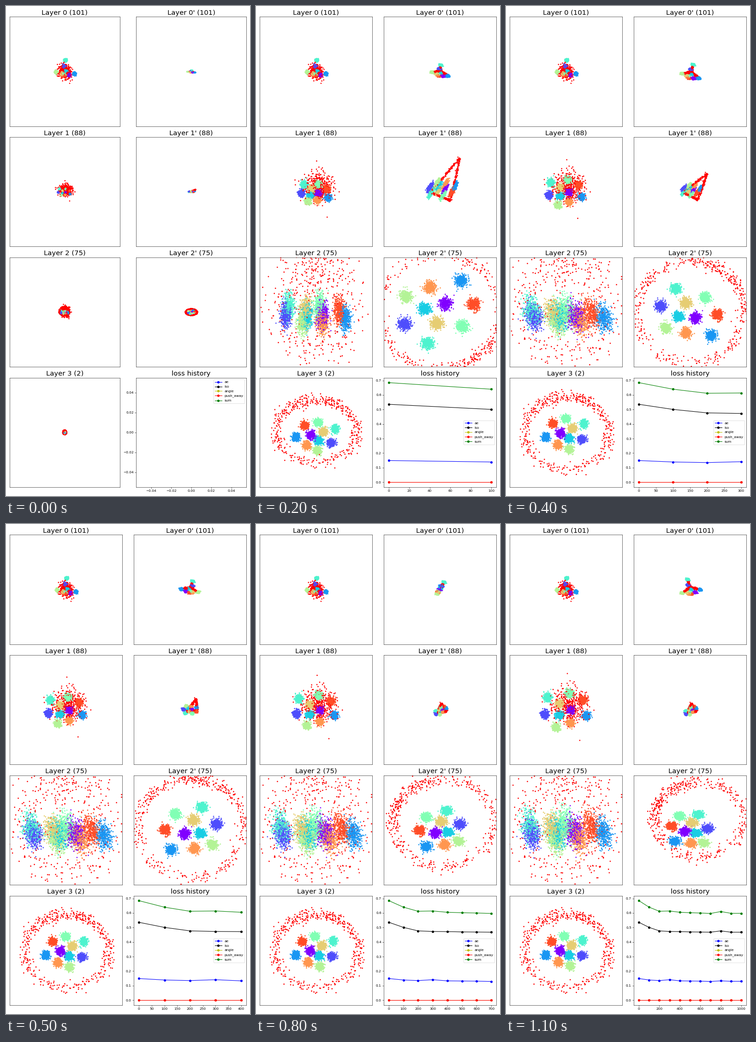
Write a matplotlib script that moves like this. It is 529 px wide and 1058 px high and loops after 1.2 s.

```python
import numpy as np
import matplotlib.pyplot as plt
from matplotlib.animation import FuncAnimation

W, H, DPI = 529, 1058, 52.9
FRAMES, STEP_MS = 12, 100
COUNT, OUTER_COUNT = 400, 450
HALF_W, HALF_H = 122.2, 117.6
COLUMN_X = (130.3, 399)
ROW_Y = (141.6, 400.9, 660.3, 919.6)
COLORS = plt.cm.rainbow(np.linspace(0, 1, 11))
UP = -np.pi / 2

# Two base arrangements of the ten clusters, in stage pixels.
# Every layer is an affine view of one, fixed by where three clusters land.
INPUT = [(140, 149), (129, 130), (152, 146.5), (133, 140), (132, 117.5),
         (128, 147), (111, 143), (124, 146), (125, 148), (130, 150)]
LATENT = [(118, 920), (165, 930), (86, 930), (137, 930), (166, 898),
          (127, 889), (139, 953), (142, 909), (114, 945), (99, 901)]
ANCHORS = [2, 4, 6]  # blue, turquoise, light green


def at(keys, step):
    """Keyed value, linear between its neighbouring keys."""
    lo = max((k for k in keys if k <= step), default=min(keys))
    hi = min((k for k in keys if k >= step), default=max(keys))
    t = (step - lo) / (hi - lo) if hi > lo else 0
    return (1 - t) * np.array(keys[lo], float) + t * np.array(keys[hi], float)


def affine_view(base, anchors):
    """Move the base so that its three anchor clusters land on the given ones."""
    rows = np.column_stack([base, np.ones(len(base))])
    return rows @ np.linalg.inv(rows[ANCHORS]) @ anchors


def cluster_points(centres, spread, rng):
    sx, sy, slope = spread
    gx, gy = rng.normal(size=(2, 10, COUNT))
    offset = np.stack([sx * gx,
                       sy * (slope * gx + np.sqrt(1 - slope**2) * gy)], -1)
    return (centres[:, None] + offset).reshape(-1, 2)


# The outer sphere (red): each helper returns a function of step, anchors, rng.
def cloud(keys):
    def points(step, anchors, rng):
        cx, cy, sx, sy = at(keys, step)
        return (cx, cy) + rng.normal(size=(OUTER_COUNT, 2)) * (sx, sy)
    return points


def ring(keys, noise, bias):
    """Noisy ellipse (cx, cy, rx, ry), densest towards the fifth value."""
    def points(step, anchors, rng):
        cx, cy, rx, ry, dense = at(keys, step)
        angle = rng.uniform(0, 2 * np.pi, OUTER_COUNT)
        angle -= bias * np.sin(angle - dense)
        ellipse = np.column_stack([cx + rx * np.cos(angle),
                                   cy + ry * np.sin(angle)])
        return ellipse + rng.normal(size=ellipse.shape) * noise
    return points


def segment_points(starts, ends, rng):
    side = rng.integers(3, size=OUTER_COUNT)
    along = rng.random((OUTER_COUNT, 1))
    line = starts[side] + along * (ends - starts)[side]
    return line + rng.normal(size=line.shape) * 1.2


def spokes(step, anchors, rng):
    hub = np.repeat(anchors.mean(axis=0)[None], 3, axis=0)
    return segment_points(hub, hub + .8 * (anchors - hub), rng)


def triangle(keys):
    def points(step, anchors, rng):
        corners = at(keys, step)
        return segment_points(corners, np.roll(corners, 1, axis=0), rng)
    return points


upright = [(445, 710), (368, 609), (347, 695)]

# Title, base, anchor keys, spread keys (sx, sy, slope), outer, start scale.
LAYERS = [
    ("Layer 0 (101)", INPUT,
     {0: [(152, 146.5), (132, 117.5), (111, 143)]},
     {0: (1.6, 1.6, 0)}, cloud({0: (130.5, 142, 7, 7)}), (1, 1)),
    ("Layer 0' (101)", INPUT,
     {2: [(416, 151), (401, 128), (382, 143)],
      4: [(418, 156), (406, 127), (382, 146)],
      5: [(381, 141), (405, 124), (416, 147)],
      7: [(421, 145), (397, 123), (384, 148)],
      9: [(383, 124), (419, 129), (402, 153)],
      11: [(421, 142), (394, 120), (382, 149)]},
     {0: (1.7, 1.2, .2)}, spokes, (.45, .2)),
    ("Layer 1 (88)", LATENT,
     {2: [(157, 414), (105, 385), (113, 421)],
      4: [(164, 412), (98, 381), (113, 429)],
      11: [(175, 414), (91, 374), (109, 438)]},
     {0: (1.7, 1.7, 0), 2: (3.2, 3.2, 0), 11: (3.9, 3.9, 0)},
     cloud({2: (134, 391, 17, 16), 11: (136, 390, 20, 19)}), (.45, .36)),
    ("Layer 1' (88)", LATENT,
     {2: [(431, 390), (379, 404), (393, 382)],
      4: [(420, 395), (385, 402), (397, 388)],
      5: [(413, 396), (389, 408), (391, 393)],
      7: [(412, 398), (390, 404), (398, 410)]},
     {2: (2.9, 4.6, -.75), 4: (2.2, 2.8, -.7), 5: (1.5, 1.3, 0)},
     triangle({2: [(442, 328), (378, 402), (422, 420)],
               4: [(436, 362), (384, 402), (416, 418)],
               5: [(412, 378), (392, 405), (414, 402)],
               7: [(402, 388), (393, 408), (413, 404)]}), (.22, .07)),
    ("Layer 2 (75)", LATENT,
     {2: [(195, 676), (71, 647), (101, 683)],
      4: [(213, 674), (56, 656), (112, 680)],
      11: [(212, 668), (52, 650), (108, 680)]},
     {2: (6, 13.5, 0), 4: (9.5, 14.5, .25), 11: (9, 16, .25)},
     ring({2: (133, 660, 65, 95, UP), 4: (132, 655, 85, 112, UP)}, 30, .72),
     (.11, .085)),
    ("Layer 2' (75)", LATENT,
     {2: [(445, 592), (372, 727), (325, 627)],
      3: upright, 4: upright,
      5: [(358, 702), (425, 610), (448, 692)],
      7: [(370, 699), (412, 615), (443, 683)],
      11: [(366, 684), (417, 626), (429, 688)]},
     {2: (6.4, 6.2, 0), 4: (5.2, 5.2, 0), 11: (5.2, 4, 0)},
     ring({2: (399, 660, 132, 124, .8), 4: (400, 661, 117, 110, -.8),
           7: (402, 648, 114, 99, -2.5), 11: (418, 638, 97, 81, -2.5)},
          7, .5), (.095, .055)),
    ("Layer 3 (2)", LATENT,
     {2: [(86, 930), (172, 912), (133, 959)],
      4: [(86, 930), (169, 901), (137, 956)],
      11: [(86, 930), (166, 898), (139, 953)]},
     {0: (4.2, 4, 0)},
     ring({2: (131, 917, 88, 68, UP), 4: (132, 921, 91, 79, UP)}, 6.5, .35),
     (.045, .065)),
]

AE = np.array([.149, .139, .135, .141, .133, .132,
               .131, .129, .133, .130, .130])
ISO = np.array([.536, .501, .477, .473, .472, .470,
                .469, .468, .477, .468, .468])
LOSSES = [("ae", "b", AE), ("iso", "k", ISO), ("angle", "y", 0 * AE),
          ("push_away", "r", 0 * AE), ("sum", "g", AE + ISO)]


def draw_layer(ax, index, step):
    title, base, anchor_keys, spread, outer, start = LAYERS[index]
    rng = np.random.default_rng(40 + index)
    anchors = at(anchor_keys, step)
    points = np.concatenate([
        cluster_points(affine_view(base, anchors), at(spread, step), rng),
        outer(step, anchors, rng)])
    colors = np.repeat(COLORS, [COUNT] * 10 + [OUTER_COUNT], axis=0)

    # Training quickly unfolds the layer from its collapsed start.
    middle = np.array([COLUMN_X[index % 2], ROW_Y[index // 2]])
    points = middle + (points - middle) * np.power(start, .05**step)

    order = rng.permutation(len(points))
    ax.scatter(*points[order].T, s=7, color=colors[order])
    ax.set(xlim=(middle[0] - HALF_W, middle[0] + HALF_W),
           ylim=(middle[1] + HALF_H, middle[1] - HALF_H),
           xticks=[], yticks=[])
    ax.set_title(title, fontsize=20)


def draw_losses(ax, step):
    for name, color, values in LOSSES:
        ax.plot(100 * np.arange(step), values[:step], "o-",
                color=color, label=name)
    ax.legend()
    ax.set_title("loss history", fontsize=20)


def update(step):
    fig.clear()
    axes = fig.subplots(4, 2).flat
    for index in range(len(LAYERS)):
        draw_layer(axes[index], index, step)
    draw_losses(axes[len(LAYERS)], step)
    fig.tight_layout()
    return []


plt.rcParams["font.family"] = "DejaVu Sans"
fig = plt.figure(figsize=(W / DPI, H / DPI), dpi=DPI, facecolor="white")
anim = FuncAnimation(fig, update, frames=FRAMES, init_func=lambda: [],
                     interval=STEP_MS, repeat=True, repeat_delay=0)
plt.show()
```
